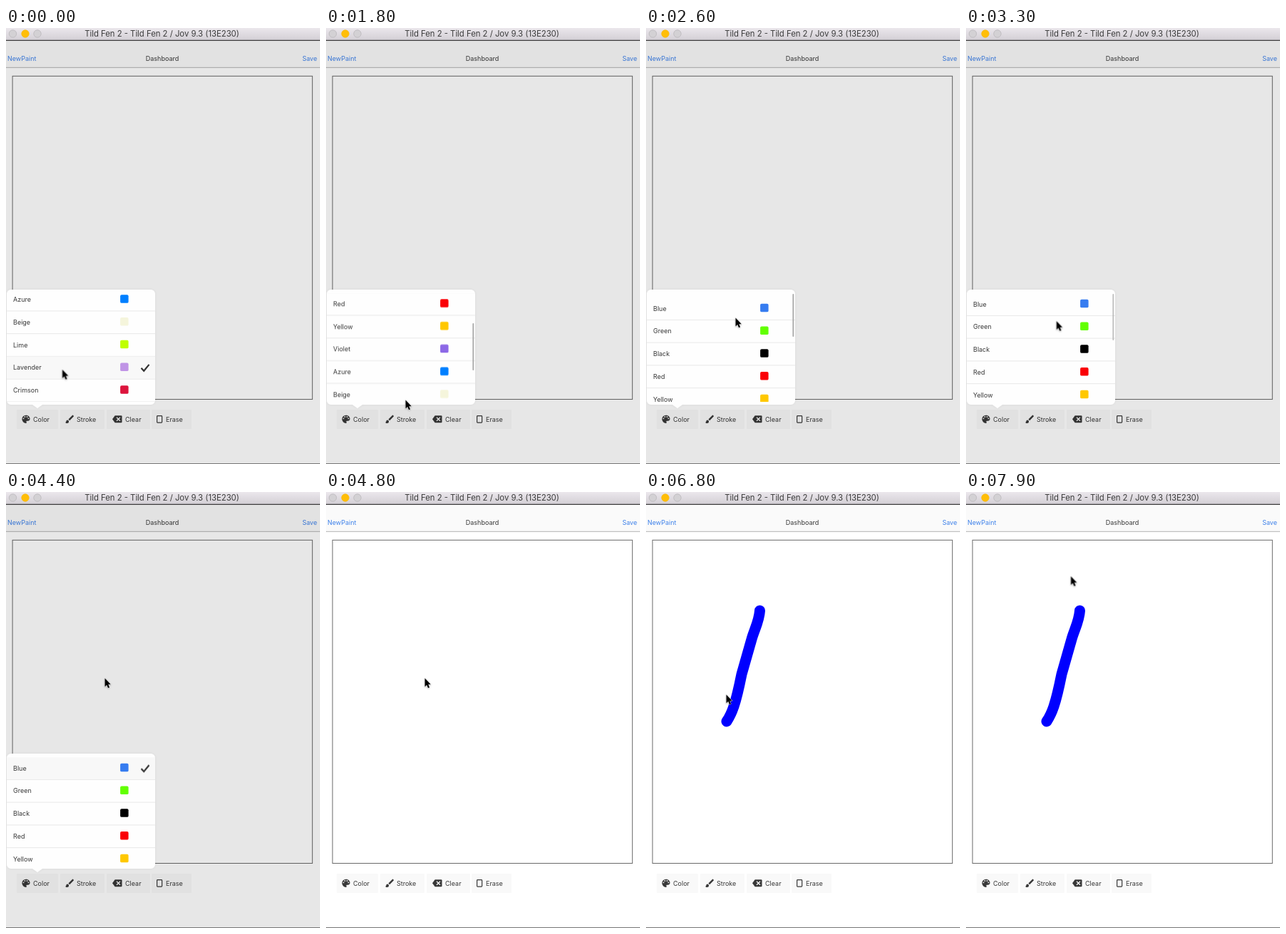
Recreate the animation shown at these times as an HTML page. Size 440 by 610 pixels, loop 8 s.

```html
<!DOCTYPE html>
<html lang="en">
<head>
<meta charset="utf-8">
<title>Paint dashboard</title>
<style>
html, body { margin: 0; width: 100%; height: 100%; overflow: hidden; background: #fff; }
svg { display: block; width: 440px; height: 610px; }
text { font: 9px Inter, Roboto, sans-serif; fill: #383838; }
.title { font-size: 11.3px; fill: #3c3c3c; }
.link { fill: #3f82ea; }
.icon { fill: #383838; }
.move { animation: 8s step-end infinite; }

/* One step is 100 ms, or 1.25 %. */
#cursor { animation-name: cursor; }
@keyframes cursor {
  0%     { transform: translate(79px, 478px); }
  12.5%  { transform: translate(79px, 478px); animation-timing-function: steps(3); }
  16.25% { transform: translate(112px, 395px); }
  18.75% { transform: translate(112px, 395px); animation-timing-function: steps(3); }
  22.5%  { transform: translate(111.5px, 520.5px); }
  23.75% { transform: translate(112px, 530px); }
  26.25% { transform: translate(112px, 530px); animation-timing-function: steps(3); }
  30%    { transform: translate(120px, 460px); animation-timing-function: steps(2); }
  32.5%  { transform: translate(125.5px, 405.5px); animation-timing-function: steps(5); }
  38.75% { transform: translate(121px, 419px); }
  40%    { transform: translate(121px, 419px); animation-timing-function: steps(4); }
  45%    { transform: translate(144.5px, 383.5px); }
  51.25% { transform: translate(144.5px, 383.5px); animation-timing-function: steps(3); }
  55%    { transform: translate(138.5px, 260.5px); }
  61.25% { transform: translate(138.5px, 260.5px); animation-timing-function: steps(7); }
  70%    { transform: translate(133px, 243px); }
  72.5%  { transform: translate(133px, 243px); animation-timing-function: steps(4); }
  77.5%  { transform: translate(158px, 130px); }
  78.75% { transform: translate(158px, 130px); animation-timing-function: steps(5); }
  85%    { transform: translate(112.5px, 283.5px); animation-timing-function: steps(4); }
  90%    { transform: translate(156px, 128px); animation-timing-function: steps(3); }
  93.75% { transform: translate(146px, 113px); animation-timing-function: steps(5); }
  98.75%, 100% { transform: translate(147px, 118px); }
}

#list { animation-name: scroll; }
@keyframes scroll {
  0%     { transform: translateY(-197px); }
  18.75% { transform: translateY(-197px); animation-timing-function: steps(3); }
  22.5%  { transform: translateY(-95.7px); animation-timing-function: steps(2); }
  25%    { transform: translateY(-18px); animation-timing-function: steps(2); }
  27.5%  { transform: translateY(20px); animation-timing-function: steps(4); }
  32.5%  { transform: translateY(6px); animation-timing-function: steps(3); }
  36.25%, 100% { transform: none; }
}

#bar { animation-name: slide, fade; }
@keyframes slide {
  0%     { transform: translateY(85px); height: 66px; }
  18.75% { transform: translateY(85px); height: 66px; animation-timing-function: steps(3); }
  22.5%  { transform: translateY(41px); height: 66px; animation-timing-function: steps(2); }
  25%    { transform: translateY(8px); height: 66px; animation-timing-function: steps(2); }
  27.5%  { transform: translateY(0); height: 47px; animation-timing-function: steps(4); }
  32.5%  { transform: translateY(0); height: 60px; animation-timing-function: steps(3); }
  36.25%, 100% { transform: translateY(0); height: 65px; }
}
@keyframes fade {
  0%  { opacity: 0; }
  20% { opacity: 1; }
  40% { opacity: 1; animation-timing-function: steps(4); }
  45%, 100% { opacity: 0; }
}

#Blue .mark { animation: pick 8s step-end infinite; }
@keyframes pick { 0% { opacity: 0; } 47.5%, 100% { opacity: 1; } }

#modal { animation-name: close; }
@keyframes close { 0% { opacity: 1; } 60%, 100% { opacity: 0; } }

#stroke { animation-name: draw; stroke-dasharray: 100 200; }
@keyframes draw {
  0%     { stroke-dashoffset: 101; }
  78.75% { stroke-dashoffset: 101; animation-timing-function: steps(5); }
  85%, 100% { stroke-dashoffset: 0; }
}
</style>
</head>
<body>
<svg viewBox="0 0 440 610">
  <defs>
    <linearGradient id="chrome" x2="0" y2="1">
      <stop stop-color="#ebe7ec"/><stop offset="1" stop-color="#d3cfd5"/>
    </linearGradient>
    <clipPath id="view"><rect y="371" width="209" height="152"/></clipPath>
  </defs>

  <rect width="440" height="610" fill="#fff"/>
  <rect y="18" width="440" height="37" fill="#fafafa"/>
  <path d="M0 55.3H440" stroke="#b2b2b2"/>
  <text class="link" x="2" y="46">NewPaint</text>
  <text x="219" y="46" text-anchor="middle">Dashboard</text>
  <text class="link" x="436" y="46" text-anchor="end">Save</text>
  <rect x="9.1" y="67.3" width="420.2" height="452.2" fill="none" stroke="#6a6a6a"/>

  <g fill="#f9f9f9">
    <rect x="15" y="534" width="58" height="27" rx="1"/>
    <rect x="76" y="534" width="62" height="27" rx="1"/>
    <rect x="141" y="534" width="61" height="27" rx="1"/>
    <rect x="204" y="534" width="56" height="27" rx="1"/>
  </g>
  <g class="icon" transform="translate(28 547.3) scale(.62) translate(-12 -12)">
    <path d="M12 3a9 9 0 0 0 0 18c.8 0 1.5-.7 1.5-1.5 0-.8-.8-1.1-.8-2 0-.8.7-1.5 1.5-1.5H16c2.8 0 5-2.2 5-5 0-4.4-4-8-9-8Z"/>
    <g fill="#f9f9f9">
      <circle cx="6.5" cy="10.5" r="1.5"/><circle cx="9.5" cy="6.5" r="1.5"/>
      <circle cx="14.5" cy="6.5" r="1.5"/><circle cx="17.5" cy="10.5" r="1.5"/>
    </g>
  </g>
  <path class="icon" transform="translate(89 547.3) scale(.63) translate(-11.5 -12)"
    d="M7 14a3 3 0 0 0-3 3c0 1.3-1.2 2-2 2 .9 1.2 2.5 2 4 2a4 4 0 0 0 4-4 3 3 0 0 0-3-3ZM20.7 4.6 19.4 3.3a1 1 0 0 0-1.4 0L9 12.2 11.8 15l8.9-9a1 1 0 0 0 0-1.4Z"/>
  <path class="icon" d="M149 547.3 152.7 542.3H161.5Q162.5 542.3 162.5 543.3V551.3Q162.5 552.3 161.5 552.3H152.7Z"/>
  <path d="M155 544.8l5 5m0-5l-5 5" stroke="#f9f9f9" stroke-width="1.3"/>
  <rect x="211.6" y="542.6" width="7" height="9.5" rx=".8" fill="none" stroke="#383838" stroke-width="1.2"/>
  <text x="38" y="550.5">Color</text>
  <text x="99" y="550.5">Stroke</text>
  <text x="167" y="550.5">Clear</text>
  <text x="224" y="550.5">Erase</text>

  <path id="stroke" class="move" pathLength="100" fill="none" stroke="#00f" stroke-width="15"
    stroke-linecap="round" stroke-linejoin="round"
    d="M159.5 166C158.500 181 152 192 148 206L134 255Q128 285 123 300Q119 312 113 321"/>

  <g id="modal" class="move">
    <rect y="18" width="440" height="591" opacity=".096"/>
    <path d="M7 366H203a6 6 0 0 1 6 6V521a6 6 0 0 1-6 6H51L44 532 37 527H7a6 6 0 0 1-6-6V372a6 6 0 0 1 6-6Z"
      fill="#fefefe" style="filter: drop-shadow(0 0 2px #0001)"/>
    <g clip-path="url(#view)"><g id="list" class="move"></g></g>
    <rect id="bar" class="move" x="205.4" y="372" width="1.8" height="66" rx=".9" fill="#a8a8a8"/>
  </g>

  <rect width="440" height="17" fill="url(#chrome)"/>
  <path d="M0 17.4H440" stroke="#3c3c3c" stroke-width="1.2"/>
  <path d="M0 609.5H440" stroke="#777"/>
  <g fill="#d3d1d4" stroke="#bab8bb" stroke-width=".8">
    <circle cx="9.5" cy="8" r="5.2"/>
    <circle cx="27" cy="8" r="5.2" fill="#ffbe08" stroke="#fbb90c"/>
    <circle cx="44" cy="8" r="5.2"/>
  </g>
  <text class="title" x="218.5" y="12.4" text-anchor="middle">Tild Fen 2 - Tild Fen 2 / Jov 9.3 (13E230)</text>

  <g id="cursor" class="move">
    <path transform="scale(.9)" d="M0 0V13.2L3 10.4 5 15.2 7.3 14.2 5.3 9.5H9.3Z"
      stroke="#fff" paint-order="stroke" style="filter: drop-shadow(0 1px 1px #0004)"/>
  </g>
</svg>
<script>
const colors = {
  Blue: '#367cf0', Green: '#62ff00', Black: '#000', Red: '#fa0007', Yellow: '#ffc800', Violet: '#8c68e6',
  Azure: '#007fff', Beige: '#f5f5dc', Lime: '#bfff00', Lavender: '#c094e6', Crimson: '#dc143c'
};
const mark = `<g class="mark">
  <rect x="1" y="-15.5" width="208" height="31" fill="#f8f8f8"/>
  <path d="M189.5 .7 193.2 4.6 200.5-4.3" fill="none" stroke="#333" stroke-width="2.2"/></g>`;

const row = ([name, color], i) => `<g id="${name}" transform="translate(0 ${386.4 + i * 31.75})">
  ${name === 'Blue' || name === 'Lavender' ? mark : ''}
  <text x="10" y="3.3">${name}</text>
  <rect x="160.1" y="-6.6" width="11.5" height="11.5" rx="1.9" fill="${color}"/>
  <path d="M1 16H209" stroke="#e8e8e8"/></g>`;

document.getElementById('list').innerHTML = Object.entries(colors).map(row).join('');
</script>
</body>
</html>
```
